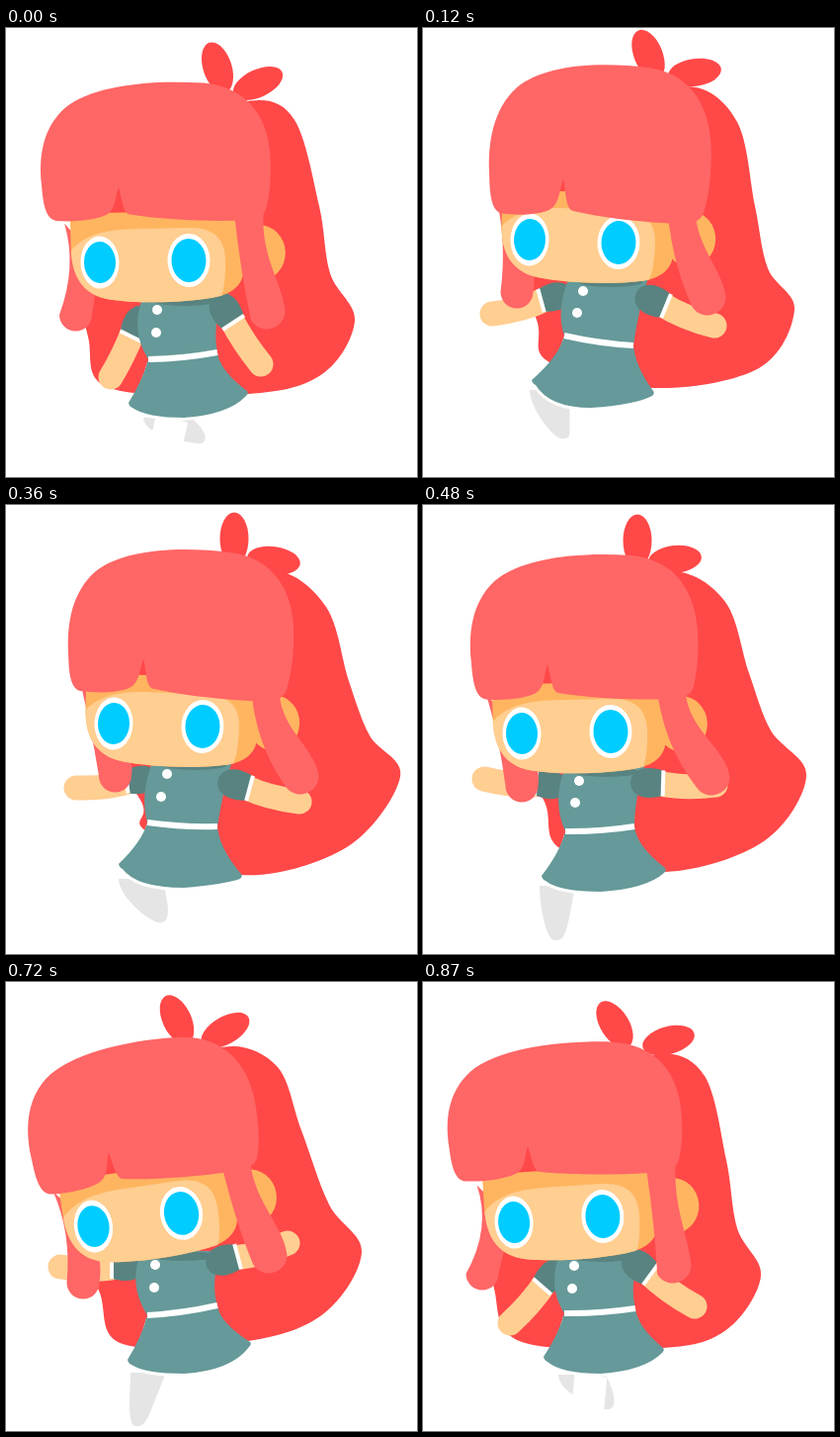
An HTML page with a canvas that plays this animation: 416 px wide and 454 px high, repeating every 0.9 s.

```html
<!DOCTYPE html>
<html lang="en">
<head>
<meta charset="utf-8">
<title>Floating girl</title>
<style>
  html, body { margin: 0; width: 100%; height: 100%; overflow: hidden; background: #fff; }
  canvas { display: block; width: 416px; height: 454px; }
</style>
</head>
<body>
<canvas id="stage" width="416" height="454"></canvas>
<script>
const ctx = document.getElementById('stage').getContext('2d');
const LOOP = 900, STEP = 30;
const TIMES = [0, 120, 360, 480, 600, 720, 870];
const HAIR = '#ff6666', BACK = '#ff4848', SKIN = '#ffce91', SHADE = '#ffb560',
      DRESS = '#669999', DARK = '#588380', EYE = '#00ccff', LEG = '#e5e5e5';

// Smooth periodic interpolation of pose rows.
function track(rows, times = TIMES) {
  const n = rows.length;
  const time = i => times[(i + n) % n] + LOOP * Math.floor(i / n);
  const row = i => rows[(i + n) % n];
  return t => {
    let i = n - 1;
    while (times[i] > t) i--;
    const t0 = time(i), span = time(i + 1) - t0, u = (t - t0) / span;
    const slope = (j, k) => (row(j + 1)[k] - row(j - 1)[k]) / (time(j + 1) - time(j - 1)) * span;
    return row(i).map((v, k) => {
      const w = row(i + 1)[k], a = slope(i, k), b = slope(i + 1, k), d = w - v;
      return v + u * (a + u * (3 * d - 2 * a - b + u * (a + b - 2 * d)));
    });
  };
}

// Eye midpoint and tilt
const head = track([
  [140, 236, -1.3], [153, 215.5, 1.9], [154, 222.5, 1.9], [145, 230, -1.3],
  [137.5, 238.5, -4.5], [133, 240.5, -8.4], [128.5, 241.5, -7], [137, 240, -3.8]
], [0, 120, 360, 480, 600, 720, 795, 870]);

// Fringe offset and stretch
const fringe = track([
  [-24.3, -75.6, 1, .985], [-13, -62, .965, 1.1], [-17, -66.5, .98, 1.05], [-17.4, -69.4, .99, 1.03],
  [-19, -71, 1, 1], [-19, -71.5, 1, 1], [-26, -76, 1.02, .95]
]);

const backHair = track([
  [292, 93, 317, 180, 328, 248, 353, 296, 320, 350, 245, 370, 105, 364, 83, 312],
  [318, 95, 336, 180, 349, 243, 376, 285, 340, 344, 235, 364, 128, 338, 115, 295],
  [324, 103, 347, 178, 368, 233, 399, 275, 345, 346, 238, 374, 142, 330, 137, 300],
  [306, 98, 330, 170, 352, 228, 388, 274, 345, 340, 245, 371, 140, 348, 122, 298],
  [290, 93, 314, 155, 338, 227, 377, 274, 330, 342, 250, 369, 133, 366, 108, 300],
  [274, 85, 299, 150, 327, 225, 360, 273, 322, 335, 245, 363, 118, 366, 94, 312],
  [285, 95, 307, 180, 318, 249, 342, 297, 308, 351, 243, 370, 100, 364, 72, 310]
]);

// Two tuft leaves: centre and tilt each
const tuft = track([
  [214, 40, -18, 255, 56, -25], [228, 27, -22, 275, 45, -8], [231, 34, 0, 271, 56, 8],
  [217, 36, 0, 255, 55, -6], [203, 39, 0, 238, 56, -12], [173, 38, -25, 222, 49, -30],
  [194, 43, -32, 248.5, 59, -15]
]);

// Rounded ends of the left and right locks
const locks = track([
  [70.5, 290, 264, 286], [95, 267, 288, 272], [110.5, 274, 298, 274], [100, 284, 292, 275],
  [91.5, 295, 284, 276], [78, 304, 266, 276], [60, 295, 253, 286]
]);

// Shoulder and hand, left then right
const arms = track([
  [132, 300, 106, 353, 223, 287, 258, 340], [132, 272, 70, 289, 234, 276, 295, 301],
  [135, 278, 71, 286, 234, 283, 297, 300], [127, 283, 62, 277, 230, 281, 296, 283],
  [122, 286, 57, 271, 225, 280, 288, 262], [120, 288, 55, 288, 222, 281, 285, 264],
  [129, 298, 88, 345, 220, 288, 275, 328]
]);

// Top and lower button, belt ends
const bodice = track([
  [153, 285, 152, 308, 144, 335, 214, 328], [162, 266, 156, 288, 143, 311, 213, 321],
  [163, 272, 157, 295, 143, 321, 214, 325], [158, 279, 154, 301, 144, 330, 214, 325],
  [153, 285, 152, 308, 145, 339, 216, 325], [151, 286, 150, 309, 143, 337, 214, 327],
  [153, 287, 151, 310, 143, 335, 215, 330]
]);

// Skirt hem: left, lowest, right
const hem = track([
  [124, 379, 180, 394, 244, 368], [110, 356, 170, 384, 233, 368], [114, 363, 180, 387, 238, 374],
  [120, 375, 180, 391, 245, 368], [127, 389, 185, 396, 250, 364], [123, 382, 180, 396, 247, 365],
  [122, 379, 180, 396, 243, 371]
]);

// Grey leg: hip, half width, toe; white leg: top and bottom
const legs = track([
  [163, 394, 24, 196, 413, 168, 395, 161, 426], [129, 366, 21, 143, 408, 165, 380, 165, 420],
  [136, 378, 22, 157, 415, 180, 385, 186, 424], [136, 385, 18, 136, 433, 172, 390, 164, 434],
  [145, 392, 17, 118, 435, 186, 398, 172, 444], [144, 395, 18, 134, 442, 183, 396, 176, 444],
  [161, 397, 24, 187, 425, 170, 398, 166, 438]
]);

const rad = deg => deg * Math.PI / 180;

function fill(color, draw) {
  ctx.beginPath();
  draw();
  ctx.fillStyle = color;
  ctx.fill();
}

function line(color, width, cap, draw) {
  ctx.beginPath();
  draw();
  ctx.strokeStyle = color;
  ctx.lineWidth = width;
  ctx.lineCap = cap;
  ctx.stroke();
}

const oval = (color, x, y, rx, ry, deg = 0) =>
  fill(color, () => ctx.ellipse(x, y, rx, ry, rad(deg), 0, 7));

function within(x, y, angle, draw) {
  ctx.save();
  ctx.translate(x, y);
  ctx.rotate(angle);
  draw();
  ctx.restore();
}

// Closed smooth curve through points
function smooth(pts) {
  const n = pts.length, at = i => pts[(i + n) % n];
  ctx.moveTo(...pts[0]);
  for (let i = 0; i < n; i++) {
    const [a, b, c, d] = [at(i - 1), at(i), at(i + 1), at(i + 2)];
    ctx.bezierCurveTo(b[0] + (c[0] - a[0]) / 6, b[1] + (c[1] - a[1]) / 6,
      c[0] - (d[0] - b[0]) / 6, c[1] - (d[1] - b[1]) / 6, c[0], c[1]);
  }
}

function drawBackHair(t, place) {
  const v = backHair(t), pts = [];
  for (let i = 0; i < v.length; i += 2) pts.push([v[i], v[i + 1]]);
  pts.push(place(-68, 0), place(-60, -60), place(40, -130), place(112, -160));
  fill(BACK, () => smooth(pts));
  const [x1, y1, a1, x2, y2, a2] = tuft(t);
  oval(BACK, x1, y1, 14.5, 26.5, a1);
  oval(BACK, x2, y2, 27, 14, a2);
}

function drawLegs(t) {
  const [hx, hy, w, tx, ty, x1, y1, x2, y2] = legs(t);
  fill(LEG, () => {
    ctx.moveTo(hx - w, hy);
    ctx.bezierCurveTo(hx - w, hy + 18, tx - 12, ty + 6, tx - 3, ty + 7);
    ctx.bezierCurveTo(tx + 9, ty + 9, tx + 10, ty - 4, hx + w, hy);
  });
  line('#fff', 33, 'butt', () => { ctx.moveTo(x1, y1); ctx.lineTo(x2, y2); });
}

function drawArm(sx, sy, hx, hy, half) {
  const angle = Math.atan2(hy - sy, hx - sx);
  line(SKIN, 25, 'round', () => {
    ctx.moveTo(sx + 8 * Math.cos(angle), sy + 8 * Math.sin(angle));
    ctx.quadraticCurveTo((sx + hx) / 2, (sy + hy) / 2 + 5, hx, hy);
  });
  within(sx, sy, angle, () => {
    fill(DARK, () => {
      ctx.moveTo(12, -half);
      ctx.bezierCurveTo(-8, -half - 6, -20, -half + 2, -20, 0);
      ctx.bezierCurveTo(-20, half - 2, -8, half + 6, 12, half);
    });
    line('#fff', 4, 'butt', () => { ctx.moveTo(13, -half); ctx.lineTo(13, half); });
  });
}

function skirt(lx, ly, rx, ry, [x1, y1, x2, y2, x3, y3]) {
  ctx.moveTo(lx, ly);
  ctx.quadraticCurveTo(lx - 5, (ly + y1) / 2 - 2, x1, y1);
  ctx.quadraticCurveTo(x1 + 1, y1 + 4, x1 + 4, y1 + 5);
  ctx.quadraticCurveTo(x1 + 18, y2, x2, y2);
  ctx.quadraticCurveTo(x3 - 19, y2 - 3, x3 - 1, y3 + 4);
  ctx.quadraticCurveTo(x3 + 2, y3 + 1, x3, y3 - 1);
  ctx.quadraticCurveTo(rx + 2, (ry + y3) / 2 - 2, rx, ry);
}

function drawDress(t) {
  const [bx, by, cx, cy, lx, ly, rx, ry] = bodice(t), h = hem(t);
  within(-1, 3, 0, () => fill('#fff', () => skirt(lx, ly, rx, ry, h)));
  fill(DRESS, () => skirt(lx, ly, rx, ry, h));
  fill(DRESS, () => {
    ctx.moveTo(bx - 14, by - 14);
    ctx.quadraticCurveTo(bx - 28, by + 20, lx, ly);
    ctx.lineTo(rx, ry);
    ctx.quadraticCurveTo(bx + 56, by + 20, bx + 66, by - 14);
  });
  oval(DARK, bx + 28, by - 9, 32, 5);
  line('#fff', 6, 'butt', () => {
    ctx.moveTo(lx, ly);
    ctx.quadraticCurveTo((lx + rx) / 2, (ly + ry) / 2 + 3, rx, ry);
  });
  oval('#fff', bx, by, 5, 5);
  oval('#fff', cx, cy, 5, 5);
}

function face() {
  ctx.moveTo(-74, -50);
  ctx.lineTo(-74, -16);
  ctx.bezierCurveTo(-74, 15, -62, 33, -35, 38);
  ctx.bezierCurveTo(-5, 43, 45, 43, 75, 37);
  ctx.bezierCurveTo(92, 33, 100, 22, 100, 12);
  ctx.lineTo(102, -50);
}

function drawFace() {
  oval(SHADE, 117, -6, 26, 28);
  fill(SHADE, face);
  ctx.save();
  ctx.beginPath();
  face();
  ctx.clip();
  fill(SKIN, () => {
    ctx.moveTo(-76, -10);
    ctx.bezierCurveTo(-62, -28, -40, -33, -10, -33);
    ctx.lineTo(45, -33);
    ctx.bezierCurveTo(72, -33, 82, -20, 82, 0);
    ctx.bezierCurveTo(82, 20, 80, 32, 74, 45);
    ctx.lineTo(-76, 45);
  });
  ctx.restore();
  oval('#fff', -45, 0, 19.5, 26.5);
  oval(EYE, -45, 0, 16, 21);
  oval('#fff', 45, 0, 21.5, 27);
  oval(EYE, 45, 0, 17.5, 22);
}

function drawFringe(x, y, sx, sy) {
  within(x, y, 0, () => {
    ctx.scale(sx, sy);
    fill(HAIR, () => {
      ctx.moveTo(0, 0);
      ctx.bezierCurveTo(3, 10, 3, 24, 9, 28);
      ctx.bezierCurveTo(40, 34, 85, 37, 118, 37);
      ctx.bezierCurveTo(135, 37, 146, 36, 149, 24);
      ctx.bezierCurveTo(154, 8, 155, -15, 154, -32);
      ctx.bezierCurveTo(152, -68, 133, -100, 88, -105);
      ctx.bezierCurveTo(30, -110, -25, -104, -52, -83);
      ctx.bezierCurveTo(-77, -62, -80, -30, -78, -5);
      ctx.bezierCurveTo(-77, 10, -76, 31, -64, 33);
      ctx.bezierCurveTo(-45, 35, -25, 33, -15, 29);
      ctx.bezierCurveTo(-3, 25, -4, 10, 0, 0);
    });
  });
}

function drawLeftLock(x, y, place) {
  fill(HAIR, () => {
    ctx.moveTo(...place(-80, -40));
    ctx.quadraticCurveTo(...place(-68, 4), x - 16.5, y);
    ctx.arc(x, y, 16.5, Math.PI, 0, true);
    ctx.quadraticCurveTo(x + 20, y - 20, ...place(-45, 0));
  });
}

function drawRightLock(x, y, place) {
  const r = 18.5;
  fill(HAIR, () => {
    ctx.moveTo(...place(92, -48));
    ctx.quadraticCurveTo(...place(97, 13), x + r * Math.cos(2.6), y + r * Math.sin(2.6));
    ctx.arc(x, y, r, 2.6, 0, true);
    ctx.bezierCurveTo(x + r - 3, y - 30, ...place(117, -3), ...place(122, -48));
  });
}

function draw(t) {
  const [x, y, deg] = head(t), angle = rad(deg);
  const c = Math.cos(angle), s = Math.sin(angle);
  const place = (px, py) => [x + px * c - py * s, y + px * s + py * c];
  const [lx, ly, rx, ry] = locks(t), arm = arms(t);

  ctx.fillStyle = '#fff';
  ctx.fillRect(0, 0, 416, 454);
  drawBackHair(t, place);
  drawLegs(t);
  drawArm(...arm.slice(0, 4), 12);
  drawDress(t);
  drawArm(...arm.slice(4), 13);
  drawLeftLock(lx, ly, place);
  within(x, y, angle, () => {
    drawFace();
    drawFringe(...fringe(t));
  });
  drawRightLock(rx, ry, place);
}

function tick() {
  draw(Math.floor(performance.now() % LOOP / STEP) * STEP);
  requestAnimationFrame(tick);
}
tick();
</script>
</body>
</html>
```
